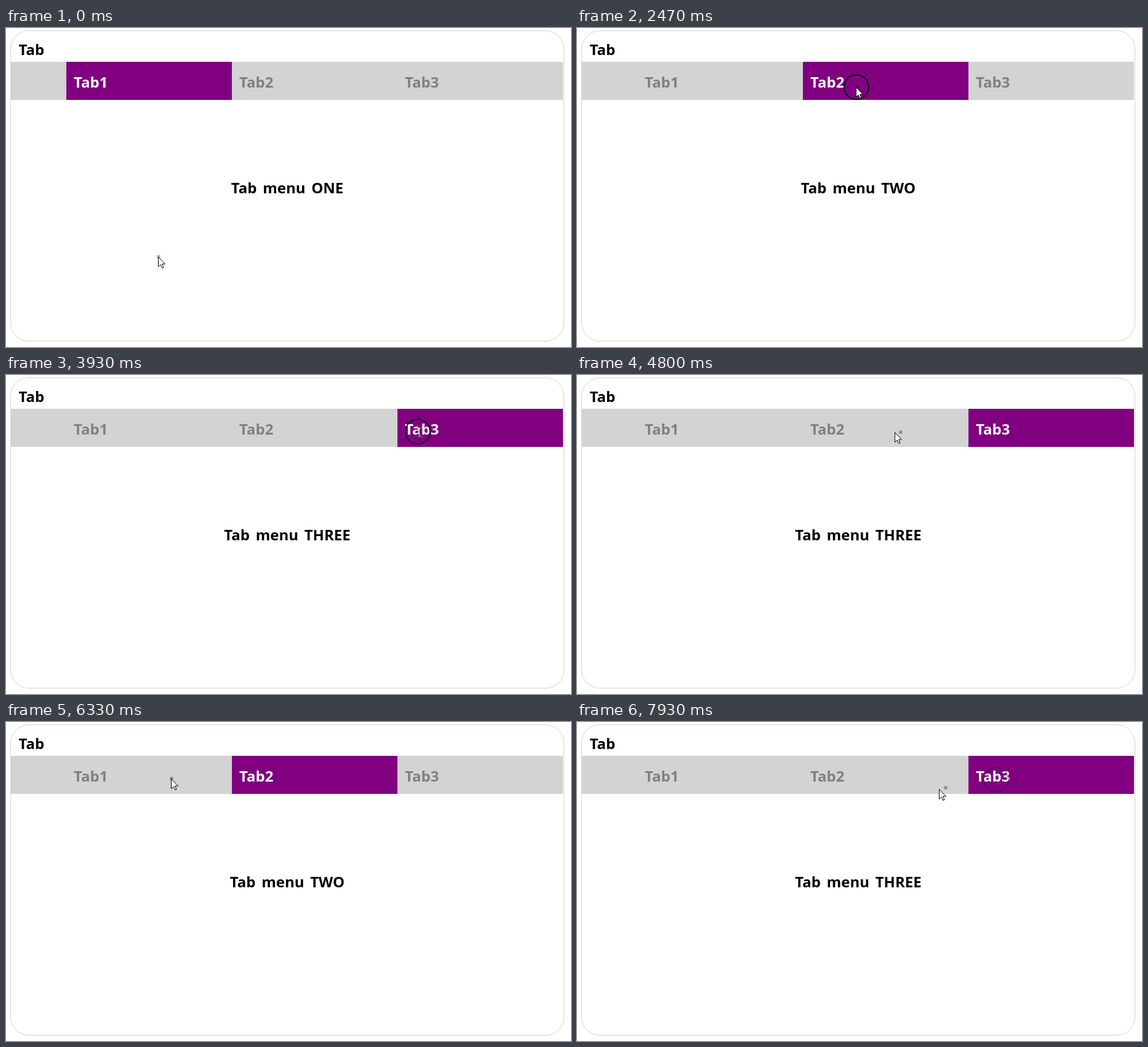
An HTML page for the animation above (8000 ms loop, 918x519 px).

```html
<!DOCTYPE html>
<html lang="en">
<head>
<meta charset="utf-8">
<title>Tab</title>
<style>
  html, body { margin: 0; width: 100%; height: 100%; overflow: hidden; background: #fff; }
  svg { display: block; width: 100%; height: 100%; }
  text { font: 700 24px "Open Sans", "Noto Sans", sans-serif; }
  #beam { mix-blend-mode: difference; }
</style>
</head>
<body>
<svg viewBox="0 0 918 519">
  <rect width="918" height="519" fill="#fff"/>
  <rect x="7.5" y="4.5" width="899" height="505" rx="29.5" fill="#fff" stroke="#d3d3d3"/>
  <text x="20.5" y="44">Tab</text>
  <rect x="8" y="55" width="897" height="62" fill="#d3d3d3"/>
  <g id="tabs"></g>
  <text id="content" x="457" y="269" text-anchor="middle" word-spacing="3.5"></text>
  <circle id="ring" r="20" fill="none" stroke="#000" stroke-width="2"/>
  <circle id="dot" r="3" fill="#000" fill-opacity=".3"/>
  <path id="arrow" d="M.5 .5V16.5L4 13L6.8 18.5L9 17.5L6.6 12H11.5Z" fill="#fff" stroke="#000"/>
  <path id="beam" d="M-3-7.5H-1M1-7.5H3M0-7V7M-3 7.5H-1M1 7.5H3" fill="none" stroke="#fff"/>
</svg>
<script>
const FPS = 15, LOOP = 8000, LAST = LOOP / 1000 * FPS - 1, FADE = 7.2;
const TAB_X = 98, TAB_W = 269;
const NAMES = ['ONE', 'TWO', 'THREE'];
const START = { x: 247, y: 372 };
const CLICKS = [36, 58, 79, 97, 114];

// Pointer moves in ticks of 1/15 s; sag bends the path downwards
const MOVES = [
  { from: 6, to: 7, x: 251, y: 371 },
  { from: 10, to: 23, x: 442, y: 121 },
  { from: 23, to: 26, x: 453, y: 96 },
  { from: 41, to: 47, x: 514, y: 125 },
  { from: 48, to: 55, x: 668, y: 92 },
  { from: 58, to: 59, x: 672, y: 92 },
  { from: 61, to: 73, x: 513, y: 93 },
  { from: 74, to: 78, x: 497, y: 93 },
  { from: 83, to: 94, x: 268, y: 92, sag: 36 },
  { from: 97, to: 108, x: 680, y: 94, sag: 57 },
  { from: 114, to: 119, x: 588, y: 109 }
];

const el = id => document.getElementById(id);
const set = (node, attrs) => {
  for (const k in attrs) node.setAttribute(k, attrs[k]);
  return node;
};
const add = (parent, tag, attrs) =>
  parent.appendChild(set(document.createElementNS('http://www.w3.org/2000/svg', tag), attrs));
const show = (node, on) => set(node, { visibility: on ? 'visible' : 'hidden' });
const clamp = v => Math.min(1, Math.max(0, v));
const ease = u => u * u * (3 - 2 * u);

const tabs = NAMES.map((_, i) => {
  const x = TAB_X + i * TAB_W;
  const box = add(el('tabs'), 'rect', { x, y: 55, width: TAB_W, height: 62 });
  const label = add(el('tabs'), 'text', { x: x + 12, y: 97 });
  label.textContent = 'Tab' + (i + 1);
  return { box, label, x };
});

function pointer(tick) {
  let { x, y } = START;
  for (const m of MOVES) {
    const p = ease(clamp((tick - m.from) / (m.to - m.from)));
    x += (m.x - x) * p;
    y += (m.y - y) * p + (m.sag || 0) * 4 * p * (1 - p);
  }
  return { x: Math.round(x), y: Math.round(y) };
}

const tabAt = x => Math.floor((x - TAB_X) / TAB_W);
const overLabel = ({ x, y }) =>
  y > 72 && y < 104 && tabs.some(tab => x > tab.x + 12 && x < tab.x + 68);

function render(ms) {
  const tick = Math.min(LAST, Math.floor((ms + 4) * FPS / 1000));
  const clicked = CLICKS.filter(c => c <= tick).pop();
  const hit = pointer(clicked || 0);
  const active = clicked ? tabAt(hit.x) : 0;

  tabs.forEach((tab, i) => {
    set(tab.box, { fill: i === active ? '#800080' : 'none' });
    set(tab.label, { fill: i === active ? '#fff' : '#808080' });
  });
  el('content').textContent = 'Tab menu ' + NAMES[active];

  const alpha = clicked ? clamp(1 - (tick - clicked) / FADE) : 0;
  set(el('ring'), { cx: hit.x + 1, cy: hit.y, opacity: alpha });

  // The dot trails the pointer by one tick
  const tip = pointer(tick), tail = pointer(tick - 1);
  set(el('dot'), { cx: tail.x + 1, cy: tail.y });

  const beam = overLabel(tip);
  show(set(el('arrow'), { transform: `translate(${tip.x} ${tip.y})` }), !beam);
  show(set(el('beam'), { transform: `translate(${tip.x + .5} ${tip.y + 1})` }), beam);
}

const start = performance.now();
function loop() {
  render((performance.now() - start) % LOOP);
  requestAnimationFrame(loop);
}
loop();
</script>
</body>
</html>
```
